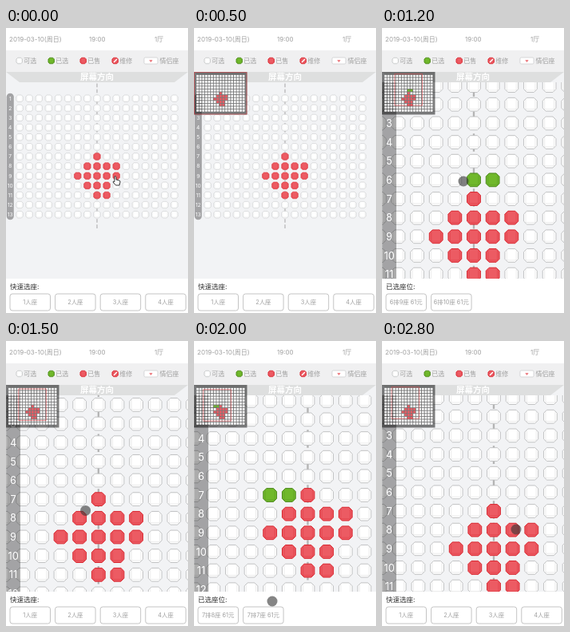
Animation of 228x357 px, one loop 2900 ms. Source, as an HTML page:

```html
<!DOCTYPE html>
<html lang="zh">
<head>
<meta charset="utf-8">
<style>
  html, body { margin: 0; width: 100%; height: 100%; overflow: hidden; background: #fff; }
  svg { display: block; width: 228px; height: 357px; font: 8px Inter, "Noto Sans CJK SC", "Noto Sans CJK", sans-serif; }
  text { fill: #a0a0a0; }
  .mid { text-anchor: middle; }
  .dark { fill: #333; }
  .white { fill: #fff; }
  .free { fill: #fff; stroke: #c0c2c3; }
  .picked { fill: #70b82b; stroke: #4a861b; }
  .sold { fill: #ec5b63; stroke: #d8222b; }
  .mini { stroke: none; }
</style>
</head>
<body>
<svg viewBox="0 0 228 357">
  <defs>
    <g id="seat" stroke-linejoin="round">
      <path d="M-4.5-8.5H4.5L8.5-4.5V4.5L4.5 8.5H-4.5L-8.5 4.5V-4.5Z"/>
      <path d="M-6-6V6H6V-6" fill="none" stroke-width=".7" opacity=".45"/>
    </g>
    <clipPath id="hallClip"><path d="M0 55H228V314H0Z"/></clipPath>
  </defs>
  <path d="M0 0H228V357H0Z" fill="#fff"/>
  <path d="M0 28H228V55H0Z" fill="#f0f0f1"/>
  <path d="M0 55H228V314H0Z" fill="#f2f3f5"/>
  <text x="4" y="16.5">2019-03-10(周日)</text>
  <text x="104" y="16.5">19:00</text>
  <text x="186" y="16.5">1厅</text>
  <g id="legend"></g>
  <g clip-path="url(#hallClip)">
    <g id="hall"></g>
    <path d="M0 55H228V68H0Z" fill="#f2f3f5"/>
    <path d="M0 55H228L211 68H17Z" fill="#dedfdf"/>
    <text class="mid white" x="114" y="65.3" font-size="10.5" font-weight="700">屏幕方向</text>
    <g id="overview"></g>
  </g>
  <g id="panel"></g>
  <g id="pointer"></g>
</svg>
<script>
const COLS = 17, ROWS = 13, UNIT = 24, LOOP = 2900, STEP = 100;
const byId = id => document.getElementById(id);
const range = n => Array.from({ length: n }, (_, i) => i);
const clamp = (v, lo, hi) => Math.min(hi, Math.max(lo, v));
const ramp = (t, from, to) => clamp((t - from) / (to - from), 0, 1);

// row: [first column, last column]
const sold = { 7: [9, 9], 8: [8, 11], 9: [7, 11], 10: [8, 10], 11: [9, 10] };

// seats are tapped one after another, then released in the same order
const rounds = [
  { row: 6, cols: [8, 9, 10], on: 700, off: 1100 },
  { row: 7, cols: [8, 7], on: 1800, off: 2100 }
];
const pickedAt = t => rounds.flatMap(({ row, cols, on, off }) => cols
  .filter((_, i) => t >= on + i * 100 && t < off + i * 150)
  .map(col => `${row}-${col}`));
const isTapping = t => rounds.some(({ cols, on }) => t >= on && t < on + cols.length * 100);

// centre of column 9, row 7 and the seat pitch
function viewAt(t) {
  const zoom = ramp(t, 500, 700), left = ramp(t, 900, 1200), up = ramp(t, 1400, 1700);
  const right = ramp(t, 1800, 2000), back = ramp(t, 2300, 2800);
  return {
    x: 114 + 7 * zoom - 6 * left + 2.5 * up + 25 * right - 2.5 * back,
    y: 161 + 53 * zoom - 47.5 * up + 26.5 * right + 20 * back,
    pitch: 12.12 + 11.53 * zoom
  };
}

// time, x, y
const fingerPath = [[700, 97, 191], [900, 121, 229], [1200, 102, 192], [1700, 98, 226], [2000, 98, 326], [2800, 168, 236]];
function fingerAt(t) {
  const next = clamp(fingerPath.findIndex(p => p[0] >= t), 1, fingerPath.length - 1);
  const [t0, x0, y0] = fingerPath[next - 1], [t1, x1, y1] = fingerPath[next];
  const f = ramp(t, t0, t1);
  return [x0 + (x1 - x0) * f, y0 + (y1 - y0) * f];
}

function eachSeat(picked, render) {
  return range(ROWS * COLS).map(i => {
    const row = Math.floor(i / COLS) + 1, col = i % COLS + 1;
    const [from, to] = sold[row] || [0, -1];
    const kind = picked.includes(`${row}-${col}`) ? "picked" : col >= from && col <= to ? "sold" : "free";
    return render(col - 9, row - 7, kind);
  }).join("");
}

function drawLegend() {
  const kinds = ["free", "picked", "sold", "sold"];
  byId("legend").innerHTML = ["可选", "已选", "已售", "维修"].map((name, i) => `
    <use href="#seat" class="${kinds[i]}" transform="translate(${16.7 + i * 40} 41) scale(.44)" stroke-width="1.8"/>
    <text x="${22.3 + i * 40}" y="43.8">${name}</text>`).join("") + `
    <path d="M135 43L139 39" stroke="#fff" stroke-width="1.4"/>
    <rect x="173" y="37" width="17" height="8" rx="1.5" class="free" stroke-width=".6"/>
    <path d="M181.5 43L179.5 40.6Q180.5 39 181.5 40.3Q182.5 39 183.5 40.6Z" fill="#ec7b80"/>
    <text x="192.5" y="43.8">情侣座</text>`;
}

function drawHall({ x, y, pitch }, picked) {
  const scale = pitch / UNIT;
  const seats = eachSeat(picked, (c, r, kind) => `<use href="#seat" x="${c * UNIT}" y="${r * UNIT}" class="${kind}"/>`);
  const numbers = range(ROWS).map(i =>
    `<text class="mid white" x="9" y="${(i - 6) * UNIT + 4.7}" font-size="13">${i + 1}</text>`).join("");
  byId("hall").innerHTML = `
    <g transform="translate(${x} ${y}) scale(${scale})">
      <path d="M0-181V182" stroke="#b4b4b4" stroke-width="2.4" stroke-dasharray="9 5"/>${seats}
    </g>
    <g transform="translate(${12 / pitch - .3} ${y}) scale(${scale})">
      <rect y="-157" width="18" height="314" rx="9" fill="#000" fill-opacity=".33"/>${numbers}
    </g>`;
}

function drawOverview({ x, y, pitch }, picked) {
  const cell = 3.6, cx = 33.3, cy = 81.8;
  const mapX = v => clamp(cx + (v - x) / pitch * cell, .5, 66);
  const mapY = v => clamp(cy + (v - y) / pitch * cell, 55.5, 108);
  const dots = eachSeat(picked, (c, r, kind) =>
    `<rect x="${cx + c * cell - 1.35}" y="${cy + r * cell - 1.35}" width="2.7" height="2.7" class="${kind} mini"/>`);
  byId("overview").innerHTML = `
    <path d="M0 55H66.5V108.5H0Z" fill="#000" fill-opacity=".5"/>${dots}
    <path d="M${mapX(0)} ${mapY(55)}H${mapX(228)}V${mapY(314)}H${mapX(0)}Z" fill="none" stroke="#e0474c" stroke-width=".6"/>`;
}

function drawPanel(picked) {
  const labels = picked.length
    ? picked.map(seat => seat.replace("-", "排") + "座 61元")
    : range(4).map(i => `${i + 1}人座`);
  byId("panel").innerHTML = `
    <text class="dark" x="5" y="327" font-size="8.5">${picked.length ? "已选座位" : "快速选座"}:</text>` +
    labels.map((label, i) => `
      <rect x="${5 + i * 56.6}" y="333" width="50.5" height="21" rx="3" fill="#fff" stroke="#c4c4c4"/>
      <text class="mid" x="${30.2 + i * 56.6}" y="346.2" font-size="7.4">${label}</text>`).join("");
}

function drawPointer(t) {
  const [x, y] = fingerAt(t);
  const hand = `<path transform="translate(133 185)" d="M3 1Q4.2 0 5 1.5V5L9 6Q10.3 6.5 10 8L9 12H4.5L1 8Q1 6.6 3 7.5Z"
    fill="#fff" stroke="#222" stroke-width=".9"/>`;
  const ring = isTapping(t) ? `<circle cx="${x}" cy="${y}" r="15" fill="none" stroke="#444"/>` : "";
  const dot = `<circle cx="${x}" cy="${y}" r="6.5" fill="#333" fill-opacity=".6"/>`;
  byId("pointer").innerHTML = t < 300 ? hand : t < 600 ? "" : ring + dot;
}

function draw(t) {
  const view = viewAt(t), picked = pickedAt(t);
  drawHall(view, picked);
  if (t < 300) byId("overview").innerHTML = "";
  else drawOverview(view, picked);
  drawPanel(picked);
  drawPointer(t);
}

let shown = -1;
function frame() {
  const t = Math.floor(performance.now() % LOOP / STEP) * STEP;
  if (t !== shown) draw(shown = t);
  requestAnimationFrame(frame);
}
drawLegend();
frame();
</script>
</body>
</html>
```
